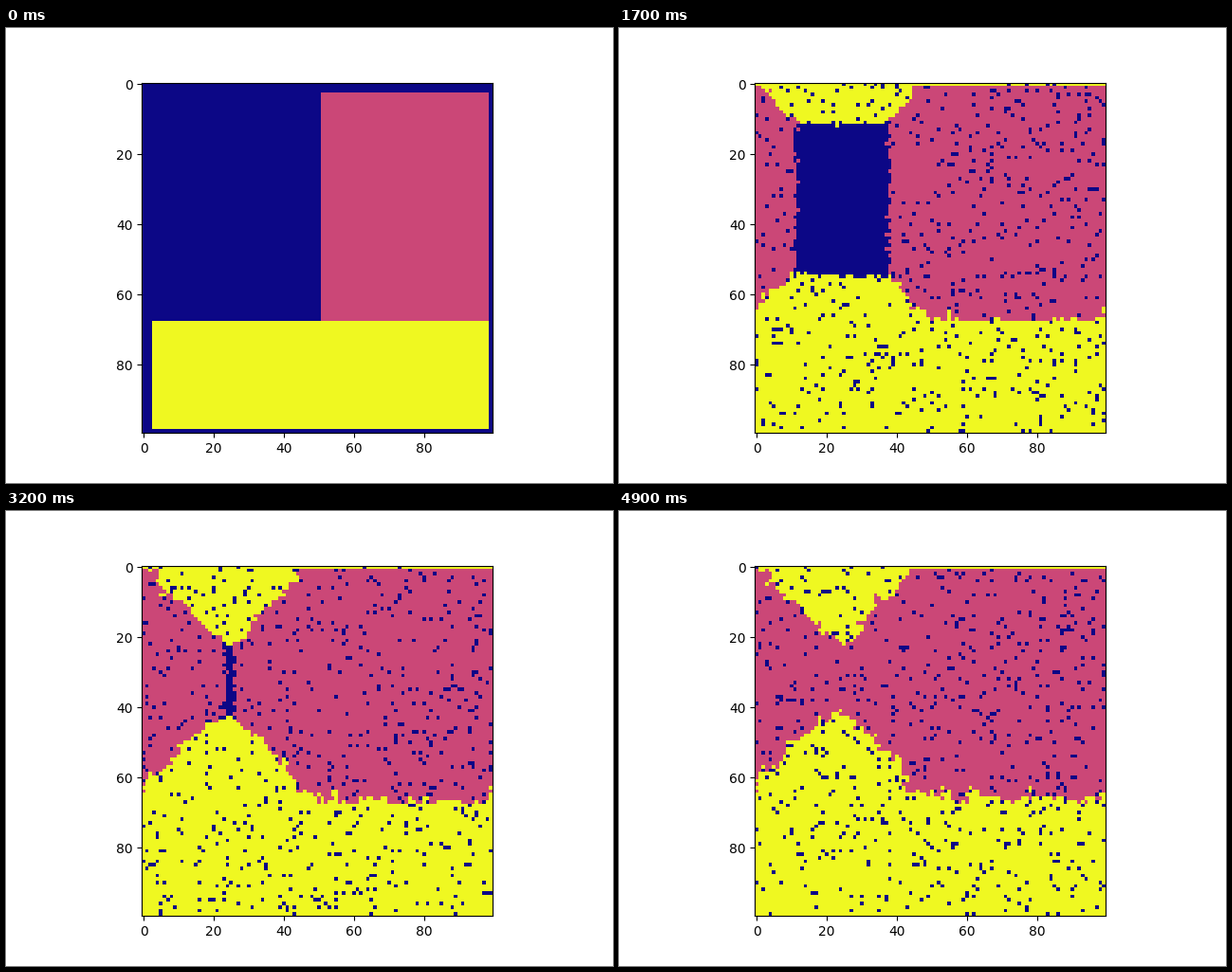
A matplotlib script for the animation above (5000 ms loop, 640 by 480 pixels).

```python
import itertools

import matplotlib.pyplot as plt
import numpy as np
from matplotlib.animation import FuncAnimation

SIZE = 100
FRAMES = 50
INTERVAL = 100
EMPTY, PINK, YELLOW = 0, 1, 2
DEATH_RATE = 0.067
STEPS_PER_CELL = 1.27
JITTER = 0.9

NEIGHBOURS = [o for o in itertools.product((-1, 0, 1), repeat=2) if o != (0, 0)]
BELOW, RIGHT = (1, 0), (0, 1)


def neighbour(grid, offset):
    return np.roll(grid, (-offset[0], -offset[1]), axis=(0, 1))


def seed_grid():
    grid = np.zeros((SIZE, SIZE), dtype=int)
    grid[3:68, 51:99] = PINK
    grid[68:99, 3:99] = YELLOW
    return grid


def distance_to_living(grid):
    reached = grid > 0
    distance = np.zeros(grid.shape)
    while not reached.all():
        distance += ~reached
        reached = reached | np.any([neighbour(reached, o) for o in NEIGHBOURS], axis=0)
    return distance


def spread(grid, rng):
    """Colour offered to each cell: below or right first, else any neighbour."""
    offer = np.zeros_like(grid)
    for offset in NEIGHBOURS:
        near = neighbour(grid, offset)
        offer = np.where(near > 0, near, offer)
    coin = rng.random(grid.shape) < 0.5
    preferred = np.where(coin, neighbour(grid, BELOW), neighbour(grid, RIGHT))
    offer = np.where(preferred > 0, preferred, offer)
    offer[0] = grid[-1]  # the top row only grows across the wrapped edge
    return offer


def simulate():
    rng = np.random.default_rng(7)
    grid = seed_grid()
    arrival = STEPS_PER_CELL * distance_to_living(grid)
    arrival += rng.normal(0, JITTER, grid.shape)
    history = [grid]
    for step in range(1, FRAMES):
        ready = (grid == EMPTY) & (step >= arrival)
        grid = np.where(ready, spread(grid, rng), grid)
        grid[rng.random(grid.shape) < DEATH_RATE] = EMPTY
        history.append(grid)
    return history


history = simulate()

fig, ax = plt.subplots(figsize=(6.4, 4.8), dpi=100)
image = ax.imshow(history[0], cmap="plasma", vmin=EMPTY, vmax=YELLOW,
                  interpolation="nearest")


def update(frame):
    image.set_data(history[frame])
    return (image,)


anim = FuncAnimation(fig, update, frames=FRAMES, interval=INTERVAL,
                     repeat=True, repeat_delay=0)
plt.show()
```
